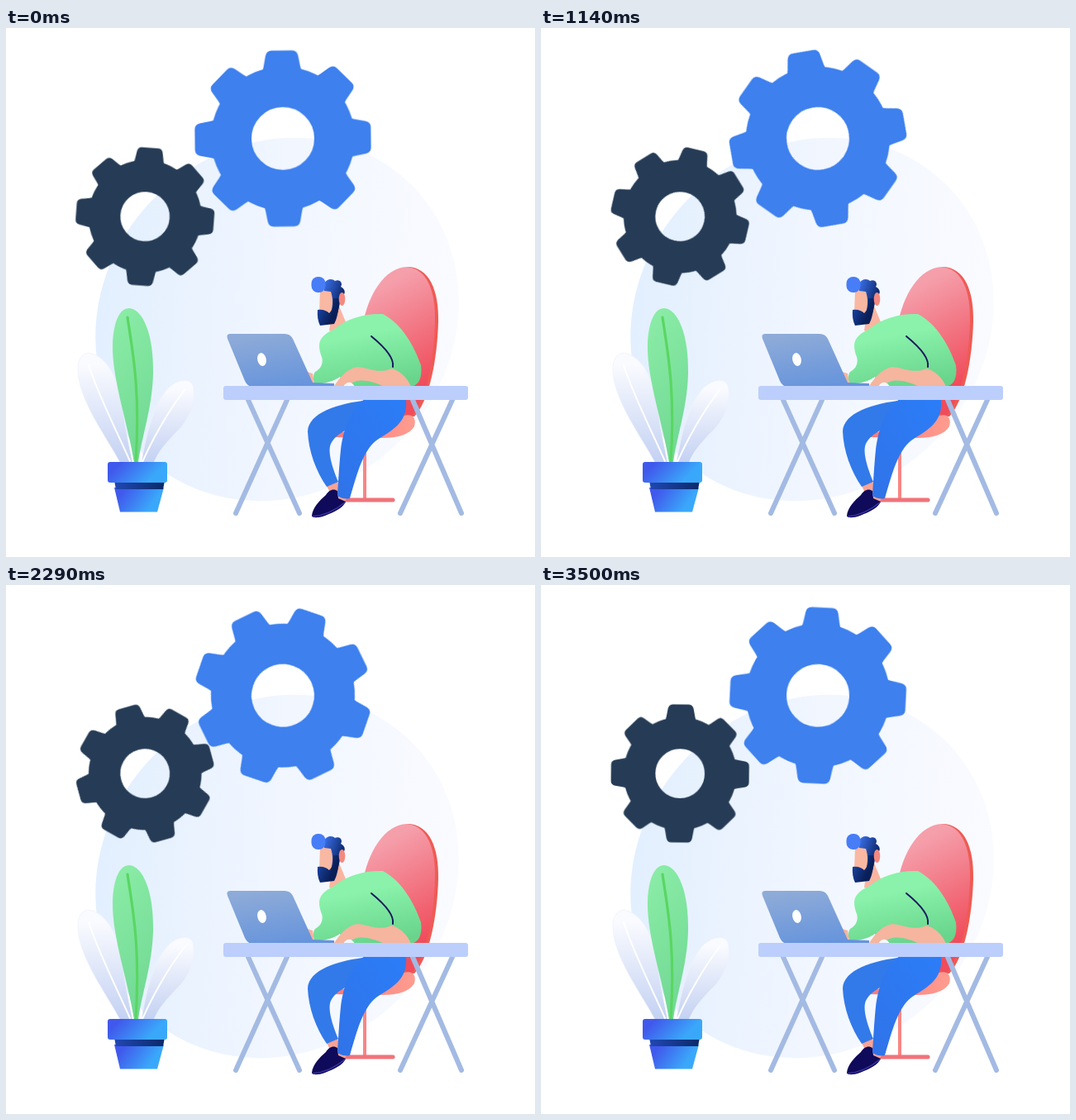
Write an HTML page without scripts that moves like this. It is 640 px wide and 640 px high and loops after 3570 ms.

```html
<!DOCTYPE html>
<html lang="en">
<head>
<meta charset="utf-8">
<title>Working at a desk</title>
<style>
  html, body { margin: 0; width: 100%; height: 100%; overflow: hidden; background: #fff; }
  svg { display: block; width: 100%; height: 100%; }
  .cw { animation: cw 3570ms steps(50) infinite; }
  .ccw { animation: ccw 3570ms steps(50) infinite; }
  @keyframes cw { to { transform: rotate(180deg); } }
  @keyframes ccw { to { transform: rotate(-180deg); } }
</style>
</head>
<body>
<svg viewBox="0 0 640 640" fill="none">
  <defs>
    <linearGradient id="disc" gradientTransform="rotate(45 .5 .5)"><stop stop-color="#e2effe"/><stop offset=".5" stop-color="#f1f6ff"/><stop offset="1" stop-color="#fafbff"/></linearGradient>
    <linearGradient id="leaf" x1=".3" x2=".6" y2="1"><stop stop-color="#8aeca6"/><stop offset="1" stop-color="#70d893"/></linearGradient>
    <linearGradient id="pale" x2="0" y2="1"><stop offset=".1" stop-color="#fafbff"/><stop offset="1" stop-color="#c3d1f2"/></linearGradient>
    <linearGradient id="pot" y2=".35"><stop offset=".2" stop-color="#4059ec"/><stop offset=".9" stop-color="#3aa8fa"/></linearGradient>
    <linearGradient id="band"><stop stop-color="#2148b4"/><stop offset="1" stop-color="#0b2968"/></linearGradient>
    <linearGradient id="chair" x1=".35" x2=".6" y2="1"><stop offset=".1" stop-color="#f59fab"/><stop offset=".85" stop-color="#f04c5b"/></linearGradient>
    <linearGradient id="seat"><stop stop-color="#f9777a"/><stop offset="1" stop-color="#ff9d90"/></linearGradient>
    <linearGradient id="jeans" x1="1" x2="0" y2="1"><stop stop-color="#2b7df8"/><stop offset="1" stop-color="#3073e8"/></linearGradient>
    <linearGradient id="shirt" x1=".3" x2=".6" y2="1"><stop offset=".3" stop-color="#8af2aa"/><stop offset="1" stop-color="#68d48c"/></linearGradient>
    <linearGradient id="laptop" x1=".3" x2=".6" y2="1"><stop stop-color="#8eabd8"/><stop offset="1" stop-color="#6694dc"/></linearGradient>
    <linearGradient id="hair" y2=".6"><stop stop-color="#3c72ee"/><stop offset=".9" stop-color="#0c2768"/></linearGradient>
    <linearGradient id="beard" y2=".6"><stop stop-color="#1d4cb4"/><stop offset=".8" stop-color="#091f58"/></linearGradient>

    <path id="tooth" d="M-24 -80L-22 -88L-19.800 -100Q-18.500 -106.500 -12.500 -106.500H12.500Q18.500 -106.500 19.800 -100L22 -88L24 -80Z" stroke="none"/>
    <g id="pair"><use href="#tooth"/><use href="#tooth" transform="rotate(180)"/></g>
    <g id="cross"><use href="#pair"/><use href="#pair" transform="rotate(90)"/></g>
    <g id="gear">
      <circle r="62.500" fill="none" stroke-width="49"/>
      <use href="#cross"/><use href="#cross" transform="rotate(45)"/>
    </g>
  </defs>

  <ellipse rx="230" ry="209" transform="translate(328 352.500) rotate(-45)" fill="url(#disc)"/>

  <g transform="translate(335 133.700) rotate(-.8)" fill="#3d80ee" stroke="#3d80ee">
    <g class="ccw"><use href="#gear"/></g>
  </g>
  <g transform="translate(168.200 228.100) rotate(4.300) scale(.784)" fill="#263c56" stroke="#263c56">
    <g class="cw"><use href="#gear"/></g>
  </g>

  <!-- plant -->
  <g stroke-linecap="round">
    <g fill="url(#pale)" stroke="#eef1fa" stroke-width=".8">
      <path d="M138 526C122 495 87 450 87 412C87 398 95 391 104 394C125 400 138 430 142 465C145 490 150 508 153 526Z"/>
      <path d="M164 526C168 498 178 455 196 436C206 426 221 422 226 432C231 450 222 475 205 490C193 503 184 513 179 526Z"/>
    </g>
    <path d="M100 408C112 445 135 490 150 524M216 438C195 465 176 500 165 525" stroke="#fff" stroke-width="2"/>
    <path d="M155 526C148 480 128 425 129 383C130 354 138 339 149 339C166 340 179 372 178 418C177 460 164 495 160 526Z" fill="url(#leaf)"/>
    <path d="M147 350C152 385 163 435 157 524" stroke="#5ad662" stroke-width="3.200"/>
  </g>
  <path d="M131 556H191L183 585.500H138Z" fill="url(#pot)"/>
  <path d="M131 548H192L190 558H133Z" fill="url(#band)"/>
  <rect x="123" y="525" width="72" height="25" rx="3" fill="url(#pot)"/>

  <!-- chair -->
  <path d="M484 289C512 288 524 318 523 355C522 400 512 452 494 470H470Z" fill="#ee5b54"/>
  <path d="M431 362C438 322 458 290 485 289C510 291 520 320 519 354C518 402 508 452 489 471L460 450Z" fill="url(#chair)"/>
  <path d="M434 494V571" stroke="#f98684" stroke-width="4"/>
  <path d="M409 571H468" stroke="#f0737a" stroke-width="5" stroke-linecap="round"/>
  <path d="M393 495C400 487 440 484 482 469C492 466 497 473 494 482C488 492 474 496 455 496Z" fill="url(#seat)"/>

  <!-- legs and shoes -->
  <path d="M387 552L401 547L404 562L413 568L408 575L394 566Z" fill="#f7a394"/>
  <path d="M370 590C371 580 380 571 387 565C391 558 397 557 401 560L402 569L411 573C408 580 399 585 386 590C378 593 370 593 370 590Z" fill="#100a5a"/>
  <path d="M371 591C385 590 399 583 410 574" stroke="#3936a0" stroke-width="1.500"/>
  <path d="M440 450C400 454 366 466 365 488C366 512 375 536 388 555L402 549C394 530 389 512 393 503C397 495 403 491 412 486L430 465Z" fill="#327ae9"/>
  <path d="M484 449H434C415 462 408 488 405 510C403 530 402 550 401 566Q409 571 416 569C426 535 432 512 448 499C466 487 487 478 484 449Z" fill="url(#jeans)"/>

  <!-- torso and head -->
  <path d="M395 338L402 334L412 358L400 370L391 366Z" fill="#f9b5a0"/>
  <path d="M379 384C379 376 386 369 396 365C414 350 436 345 456 346C479 358 494 385 502 408C504 424 499 433 489 434H410L404 422C396 428 382 431 373 430C371 424 372 418 374 416C382 412 384 404 382 398C380 393 379 389 379 384Z" fill="url(#shirt)"/>
  <path d="M397 433C403 425 410 413 425 410C438 411 452 419 466 412C476 414 486 423 490 434H458C442 427 425 422 414 433Z" fill="#f5b59e"/>
  <path d="M442 373C458 386 470 399 468 410" stroke="#15185f" stroke-width="2" stroke-linecap="round"/>
  <path d="M361 415L371 418L373 430L364 430Z" fill="#f7b49f"/>
  <path d="M380 317H397V345H379Z" fill="#f9b8a2"/>
  <path d="M385 309C388 303 395 303 398 306C404 303 408 309 405 313C411 316 411 322 407 324C404 328 404 336 401 345L394 341C396 332 395 325 393 319L385 318Z" fill="url(#hair)"/>
  <path d="M377 341C383 340 388 342 391 345C396 341 396 333 396 327L403 327C403 342 400 353 397 358L380 360Q376 352 377 341Z" fill="url(#beard)"/>
  <rect x="369.500" y="301" width="17" height="19" rx="8" fill="#477df6"/>
  <ellipse cx="406.500" cy="328" rx="3.800" ry="8" fill="#f48980"/>

  <!-- laptop -->
  <path d="M271 370H337Q344 370 347 376L371 429L397 430V434H297Q292 433 289 427L268 376Q266 370 271 370Z" fill="url(#laptop)"/>
  <ellipse cx="309.500" cy="401" rx="5.300" ry="8" transform="rotate(-12 309.500 401)" fill="#fff"/>
  <path d="M408 434C411 428 418 426 422 434Z" fill="#f3f7ff"/>

  <!-- desk -->
  <path d="M293 450L355 587M340 450L278 587M492 450L551 587M540 450L477 587" stroke="#a3bae3" stroke-width="6" stroke-linecap="round"/>
  <rect x="263" y="433" width="296" height="17" rx="3" fill="#bccefb"/>
</svg>
</body>
</html>
```
